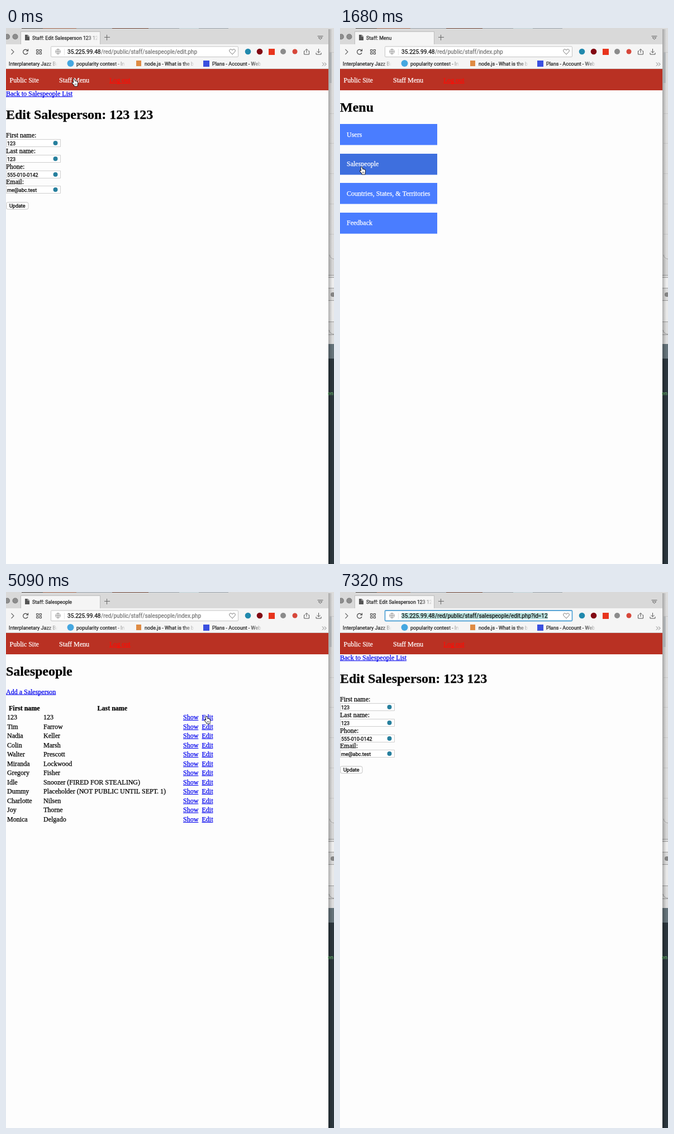
Animation of 587x955 px, one loop 8 s. Source, as an HTML page with a canvas:

```html
<!DOCTYPE html>
<html lang="en">
<head>
<meta charset="utf-8">
<title>Staff area</title>
<style>
html, body { margin: 0; width: 100%; height: 100%; overflow: hidden; background: #fdfdfd; }
canvas { display: block; }
</style>
</head>
<body>
<canvas id="stage" width="587" height="955"></canvas>
<script>
const ctx = document.getElementById('stage').getContext('2d');
const LOOP = 8000;
const SERIF = '"Liberation Serif", "Times New Roman", serif';
const SANS = 'Roboto, sans-serif';
const BODY = `12px ${SERIF}`;
const BOLD = `bold 12px ${SERIF}`;
const HEADING = `bold 24px ${SERIF}`;
const SMALL = `9px ${SANS}`;
const TAU = Math.PI * 2;

// The page answers about 290 ms after each click.
const MENU_AT = 440, LIST_AT = 2870, EDIT_AT = 5380;
const FOCUS_AT = 6130, MARKS_AT = 6730, HOVER_AT = 1530;

const pages = [
  { from: 0, draw: editPage, title: 'Edit Salesperson 123 123', path: 'salespeople/edit.php' },
  { from: MENU_AT, draw: menuPage, title: 'Menu', path: 'index.php' },
  { from: LIST_AT, draw: listPage, title: 'Salespeople', path: 'salespeople/index.php' },
  { from: EDIT_AT, draw: editPage, title: 'Edit Salesperson 123 123', path: 'salespeople/edit.php' }
];

// time, left, top, pointer
const pointerKeys = [
  [0, 118, 90, hand], [1100, 115, 162, arrow], [1240, 94, 190, arrow],
  [1390, 64, 216, arrow], [HOVER_AT, 43, 239, hand], [1680, 35, 247, hand],
  [3020, 36, 247, arrow], [3170, 44, 246, arrow], [3320, 60, 244, arrow],
  [3460, 86, 240, arrow], [3620, 119, 236, arrow], [3770, 190, 230, arrow],
  [3920, 268, 225, arrow], [4060, 332, 222, hand], [4200, 355, 221, hand],
  [5530, 353, 182, arrow], [5680, 346, 116, arrow], [5830, 335, 60, arrow],
  [5990, 326, 35, iBeam], [6430, 338, 33, iBeam], [6580, 356, 19, arrow],
  [6730, 372, 4, arrow], [6880, 376, -20, arrow]
];

const people = [
  ['123', '123'], ['Tim', 'Farrow'], ['Nadia', 'Keller'], ['Colin', 'Marsh'],
  ['Walter', 'Prescott'], ['Miranda', 'Lockwood'], ['Gregory', 'Fisher'],
  ['Idle', 'Snoozer (FIRED FOR STEALING)'],
  ['Dummy', 'Placeholder (NOT PUBLIC UNTIL SEPT. 1)'],
  ['Charlotte', 'Nilsen'], ['Joy', 'Thorne'], ['Monica', 'Delgado']
];

const current = (keys, started) => keys.filter(started).pop();

function rect(x, y, w, h, color) {
  ctx.fillStyle = color;
  ctx.fillRect(x, y, w, h);
}

function disc(x, y, r, color) {
  ctx.fillStyle = color;
  ctx.beginPath();
  ctx.arc(x, y, r, 0, TAU);
  ctx.fill();
}

function box(x, y, w, h, r, fill, stroke, width = 1) {
  ctx.beginPath();
  ctx.roundRect(x, y, w, h, r);
  ctx.fillStyle = fill;
  ctx.fill();
  ctx.strokeStyle = stroke;
  ctx.lineWidth = width;
  ctx.stroke();
}

function line(path, color = '#555', width = 1) {
  ctx.strokeStyle = color;
  ctx.lineWidth = width;
  ctx.stroke(new Path2D(path));
}

// A hairline around each letter gives the heavier font smoothing.
function text(str, x, y, font = BODY, color = '#000') {
  ctx.font = font;
  ctx.fillStyle = ctx.strokeStyle = color;
  ctx.lineWidth = .25;
  ctx.fillText(str, x, y);
  ctx.strokeText(str, x, y);
}

function link(str, x, y, color = '#0000ee') {
  text(str, x, y, BODY, color);
  rect(x, y + 1, ctx.measureText(str).width, 1, color);
}

function fadedText(str, x, y, end, font) {
  const fade = ctx.createLinearGradient(end - 22, 0, end, 0);
  fade.addColorStop(0, '#222');
  fade.addColorStop(1, 'rgba(34,34,34,0)');
  text(str, x, y, font, fade);
}

function backdrop() {
  rect(577, 0, 10, 564, '#dcdcdc');
  rect(579, 43, 4, 55, '#c2c7ca');
  for (const y of [43, 152, 205, 259, 313, 367]) rect(579, y, 8, 1, '#c9c9c9');
  line('M579 404Q580 411 587 411.5', '#a9a9a9');
  rect(578, 412, 9, 28, '#d6d6d6');
  for (const y of [440, 444, 463, 485, 523, 546]) rect(577, y, 10, 1, '#9c9c9c');
  rect(577, 445, 10, 18, '#eee');
  rect(577, 486, 10, 37, '#e9e9e9');
  line('M578 538Q579 545 587 545.5', '#999');
  disc(585, 475, 4, '#858585');
  rect(577, 563, 10, 26, '#65737a');
  rect(577, 589, 10, 366, '#2b363d');
  text('en', 576, 654, SMALL, '#62ad69');
  const shade = ctx.createLinearGradient(577, 0, 584, 0);
  shade.addColorStop(0, 'rgba(0,0,0,.25)');
  shade.addColorStop(1, 'rgba(0,0,0,0)');
  rect(577, 2, 10, 953, shade);
}

function tabBar(title) {
  rect(0, 0, 577, 30, '#d9d9d9');
  rect(28, 0, 370, 1, '#9aa4ac');
  rect(28, 0, 38, 1, '#4b4540');
  rect(66, 0, 60, 1, '#a4674f');
  rect(190, 0, 65, 1, '#704638');
  rect(310, 0, 35, 1, '#c2d7df');
  for (const x of [2, 16.5]) {
    disc(x, 15.5, 5, '#747474');
    disc(x, 15.5, 4.2, '#8d8d8d');
  }
  rect(26, 6, 143, 24, '#bdbdbd');
  rect(27, 7, 141, 23, '#f5f5f5');
  ctx.fillStyle = '#555';
  ctx.fill(new Path2D('M34 12H39L42 15V22H34Z'));
  line('M39 12V15H42', '#f5f5f5', .7);
  fadedText('Staff: ' + title, 47, 20.5, 165, `8.8px ${SANS}`);
  line('M176 16.5H186M180.5 12V22', '#666');
  line('M557.5 14.5H567.5M559 17L562.5 20.5L566 17Z', '#666');
}

function toolbar(path, focused) {
  rect(0, 29, 577, 43, '#f5f5f5');
  line('M9.5 38L14 42.5L9.5 47', '#666', 1.1);
  line('M38.7 40.5A4.3 4.3 0 1 0 39 44M39.5 37.5V41H36', '#444', 1.2);
  for (const x of [54.5, 60])
    for (const y of [38.5, 43.5]) line(`M${x} ${y}h3.5v3h-3.5z`, '#444');
  box(80.5, 33, 335, 18.5, 1.5, '#fff', focused ? '#58a5d6' : '#c4c4c4', focused ? 1.8 : 1);
  line('M97.5 42A4.5 4.5 0 1 0 88.5 42A4.5 4.5 0 1 0 97.5 42M88.5 42H97.5M93 37.5V46.5M93 37.5Q88.5 42 93 46.5Q97.5 42 93 37.5', '#8a8a8a', .7);
  rect(104, 37, 1, 11, '#e4e4e4');
  if (focused) rect(110, 37, 262, 11, '#b9e1de');
  text('35.225.99.48', 110, 46, `10.2px ${SANS}`, '#111');
  text(`/red/public/staff/${path}${focused ? '?id=12' : ''}`, 170, 46, `10px ${SANS}`, focused ? '#111' : '#777');
  line('M405 47L400.5 42.5Q398.5 39 401.5 37.8Q404 37.3 405 39.8Q406 37.3 408.5 37.8Q411.5 39 409.5 42.5Z', '#777');

  disc(433, 42, 5.3, '#2189ad');
  disc(454, 42, 5.3, '#820813');
  rect(470, 37, 11, 11, '#e8341c');
  disc(496, 42, 5, '#8b8b8b');
  disc(517, 42, 4.5, '#d7473a');
  line('M535 41H533.5V47H542.5V41H541M538 44V37.5M535.5 40L538 37.5L540.5 40', '#555');
  line('M559.5 37V44M556.5 41.2L559.5 44.2L562.5 41.2M555 44V47H564V44', '#555');
}

function bookmarks() {
  fadedText('Interplanetary Jazz Ban', 5, 66.5, 92, SMALL);
  disc(115.5, 63, 6, '#45a7e0');
  fadedText('popularity contest - In', 126, 66.5, 214, SMALL);
  rect(233, 58, 9, 10, '#df8b43');
  fadedText('node.js - What is the b', 248, 66.5, 337, SMALL);
  rect(353, 58, 11, 11, '#3a50e0');
  fadedText('Plans - Account - Web', 369, 66.5, 458, SMALL);
  line('M566 61.5L569 64.5L566 67.5M570 61.5L573 64.5L570 67.5', '#666', .9);
  rect(0, 72, 577, 1, '#cfcfcf');
}

function navBar() {
  rect(0, 73, 577, 38, '#b93123');
  text('Public Site', 6.5, 97, BODY, '#fff');
  text('Staff Menu', 95, 97, BODY, '#fff');
  link('Log out', 185, 97, '#ff0c05');
}

function editPage(t) {
  link('Back to Salespeople List', 0, 121);
  text('Edit Salesperson: 123 123', 0, 162, HEADING);
  const fields = [
    ['First name:', '123'], ['Last name:', '123'],
    ['Phone:', '555-010-0142'], ['Email:', 'me@abc.test']
  ];
  const marked = t < EDIT_AT || t >= MARKS_AT;
  fields.forEach(([label, value], i) => {
    const y = Math.round(198 + i * 27.75);
    text(label, 0, y - 3);
    box(.5, y + .5, 97, 13, 0, '#fff', '#cecece');
    text(value, 2, y + 10.5, SMALL);
    if (marked) disc(88.5, y + 7, 4, '#267f9d');
  });
  box(.5, 310.5, 39.5, 12.5, 3, '#fff', '#c3c3c3');
  text('Update', 6, 320, SMALL);
}

function menuPage(t) {
  text('Menu', 0, 148.5, HEADING);
  const items = ['Users', 'Salespeople', 'Countries, States, & Territories', 'Feedback'];
  items.forEach((item, i) => {
    const y = 171 + i * 52.5;
    const hovered = i === 1 && t >= HOVER_AT;
    rect(0, Math.round(y), 174, 37.5, hovered ? '#3e6fde' : '#4a7dff');
    text(item, 12, Math.round(y + 22.5), BODY, '#fff');
  });
}

function listPage() {
  text('Salespeople', 0, 148.5, HEADING);
  link('Add a Salesperson', 0, 181.5);
  text('First name', 5, 211, BOLD);
  text('Last name', 163.5, 211, BOLD);
  people.forEach(([first, last], i) => {
    const y = Math.floor(227.5 + i * 16.5);
    text(first, 2, y);
    text(last, 67, y);
    link('Show', 317, y);
    link('Edit', 350.5, y);
  });
}

function shape(path, fill, stroke, width) {
  const p = new Path2D(path);
  ctx.lineJoin = 'round';
  ctx.lineWidth = width;
  ctx.strokeStyle = stroke;
  ctx.stroke(p);
  ctx.fillStyle = fill;
  ctx.fill(p);
}

function hand() {
  shape('M2.5 1.5Q3.5 0 4.5 1.5L5.3 5Q6.5 4 7.3 5.3Q8.5 4.7 9.2 6Q10.3 6 10.3 7.5L9.7 11V13.5H4.3V12L.8 8.2Q.3 6.8 1.7 7L3.2 8.2Z', '#fff', '#000', 1.6);
  line('M5.5 9V11.5M7.5 9V11.5', '#000', .7);
}

function arrow() {
  shape('M.5 .5V10.5L2.8 8.4L4.5 12.5L6.3 11.7L4.6 7.8H7.6Z', '#000', '#fff', 1.6);
}

function iBeam() {
  const beam = 'M1 .5Q3.5 .5 3.5 2.5Q3.5 .5 6 .5M3.5 2V10M1 11.5Q3.5 11.5 3.5 9.5Q3.5 11.5 6 11.5M2.3 7.5H4.7';
  line(beam, '#fff', 2.2);
  line(beam, '#000', 1);
}

function render(t) {
  const page = current(pages, p => p.from <= t);
  rect(0, 0, 587, 955, '#fdfdfd');
  backdrop();
  tabBar(page.title);
  toolbar(page.path, t >= FOCUS_AT);
  bookmarks();
  navBar();
  page.draw(t);
  const [, x, y, pointer] = current(pointerKeys, k => k[0] <= t);
  ctx.save();
  ctx.translate(x, y);
  pointer();
  ctx.restore();
}

const start = performance.now();
function tick() {
  render((performance.now() - start) % LOOP);
  requestAnimationFrame(tick);
}
tick();
</script>
</body>
</html>
```
